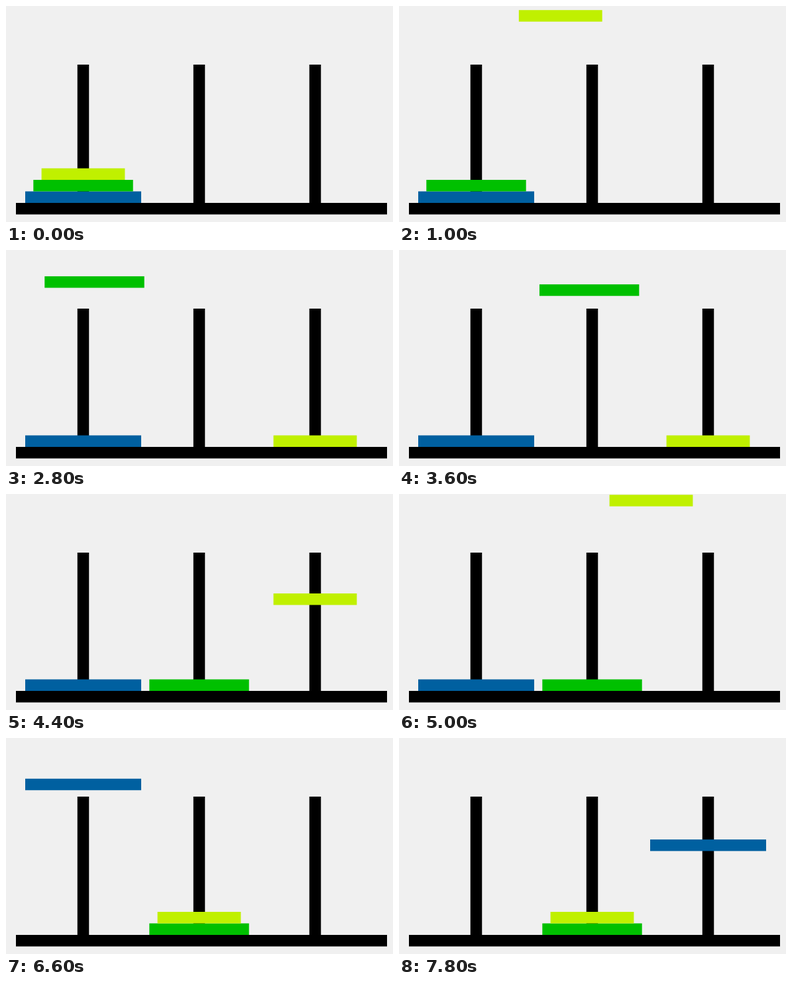
Write an HTML page with a canvas that moves like this. It is 584x328 px and loops after 8000 ms.

```html
<!DOCTYPE html>
<html lang="en">
<head>
<meta charset="utf-8">
<title>Tower puzzle</title>
<style>
  html, body { margin: 0; width: 100%; height: 100%; overflow: hidden; background: #f0f0f0; }
  canvas { display: block; width: 100%; height: 100%; }
</style>
</head>
<body>
<canvas id="stage" width="584" height="328"></canvas>
<script>
const ctx = document.getElementById('stage').getContext('2d');

const LOOP = 8000, FIRST = 260, PERIOD = 1955;
const UNIT = 17.5, FLOOR = 299;
const PEGS = [116.5, 291.5, 466.5];
const LIFT = 56.5, ARCH = 55.3;

const DISKS = [
  { color: '#0060a0', width: 175 },
  { color: '#00c000', width: 150.4 },
  { color: '#c0f000', width: 125.8 }
];
// disk index, from peg, to peg
const MOVES = [[2, 0, 2], [1, 0, 1], [2, 2, 1], [0, 0, 2]];

// Progress of each part of a move: [ms, fraction]
const RISE = [[0, 0], [230, .578], [475, .9756], [510, 1]];
const CROSS = [[495, 0], [585, .0957], [740, .362], [830, .49], [940, .638],
               [1140, .861], [1275, .924], [1440, 1]];
const DROP = [[1430, 0], [1540, .1356], [1585, .2], [1630, .3205], [1675, .431], [1840, 1]];

// Monotone cubic interpolation through points
function curve(pts, t) {
  const last = pts.length - 1;
  if (t <= pts[0][0]) return pts[0][1];
  if (t >= pts[last][0]) return pts[last][1];
  const slope = i => (pts[i + 1][1] - pts[i][1]) / (pts[i + 1][0] - pts[i][0]);
  const tangent = i => {
    if (i === 0) return slope(0);
    if (i === last) return slope(last - 1);
    const a = slope(i - 1), b = slope(i);
    return 2 * a * b / (a + b);
  };
  let i = 0;
  while (t > pts[i + 1][0]) i++;
  const h = pts[i + 1][0] - pts[i][0], s = (t - pts[i][0]) / h;
  const s2 = s * s, s3 = s2 * s;
  return (2 * s3 - 3 * s2 + 1) * pts[i][1] + (s3 - 2 * s2 + s) * h * tangent(i)
       + (3 * s2 - 2 * s3) * pts[i + 1][1] + (s3 - s2) * h * tangent(i + 1);
}

const rowTop = row => FLOOR - UNIT * (row + 1);
const mix = (a, b, k) => a + (b - a) * k;

function flight(from, to, y0, y1, t) {
  const u = curve(CROSS, t);
  const rise = curve(RISE, t), drop = curve(DROP, t);
  const base = drop > 0 ? mix(LIFT, y1, drop) : mix(y0, LIFT, rise);
  return { x: mix(PEGS[from], PEGS[to], u), y: base - ARCH * Math.sin(Math.PI * u) };
}

function layout(time) {
  const stacks = [[0, 1, 2], [], []];
  const spots = [];
  MOVES.forEach(([disk, from, to], k) => {
    const t = time - FIRST - k * PERIOD;
    if (t <= 0) return;
    const y0 = rowTop(stacks[from].length - 1);
    stacks[from].pop();
    const y1 = rowTop(stacks[to].length);
    stacks[to].push(disk);
    spots[disk] = flight(from, to, y0, y1, t);
  });
  return DISKS.map((d, i) => spots[i] || { x: PEGS[0], y: rowTop(i) });
}

function draw(time) {
  ctx.fillStyle = '#f0f0f0';
  ctx.fillRect(0, 0, 584, 328);
  ctx.fillStyle = '#000';
  ctx.fillRect(15, FLOOR, 560, UNIT);
  for (const x of PEGS) ctx.fillRect(x - UNIT / 2, 89, UNIT, 210);
  layout(time).forEach((p, i) => {
    const { color, width } = DISKS[i];
    ctx.fillStyle = color;
    ctx.fillRect(p.x - width / 2, p.y, width, UNIT);
  });
}

const start = performance.now();
function tick() {
  draw((performance.now() - start) % LOOP);
  requestAnimationFrame(tick);
}
tick();
</script>
</body>
</html>
```
